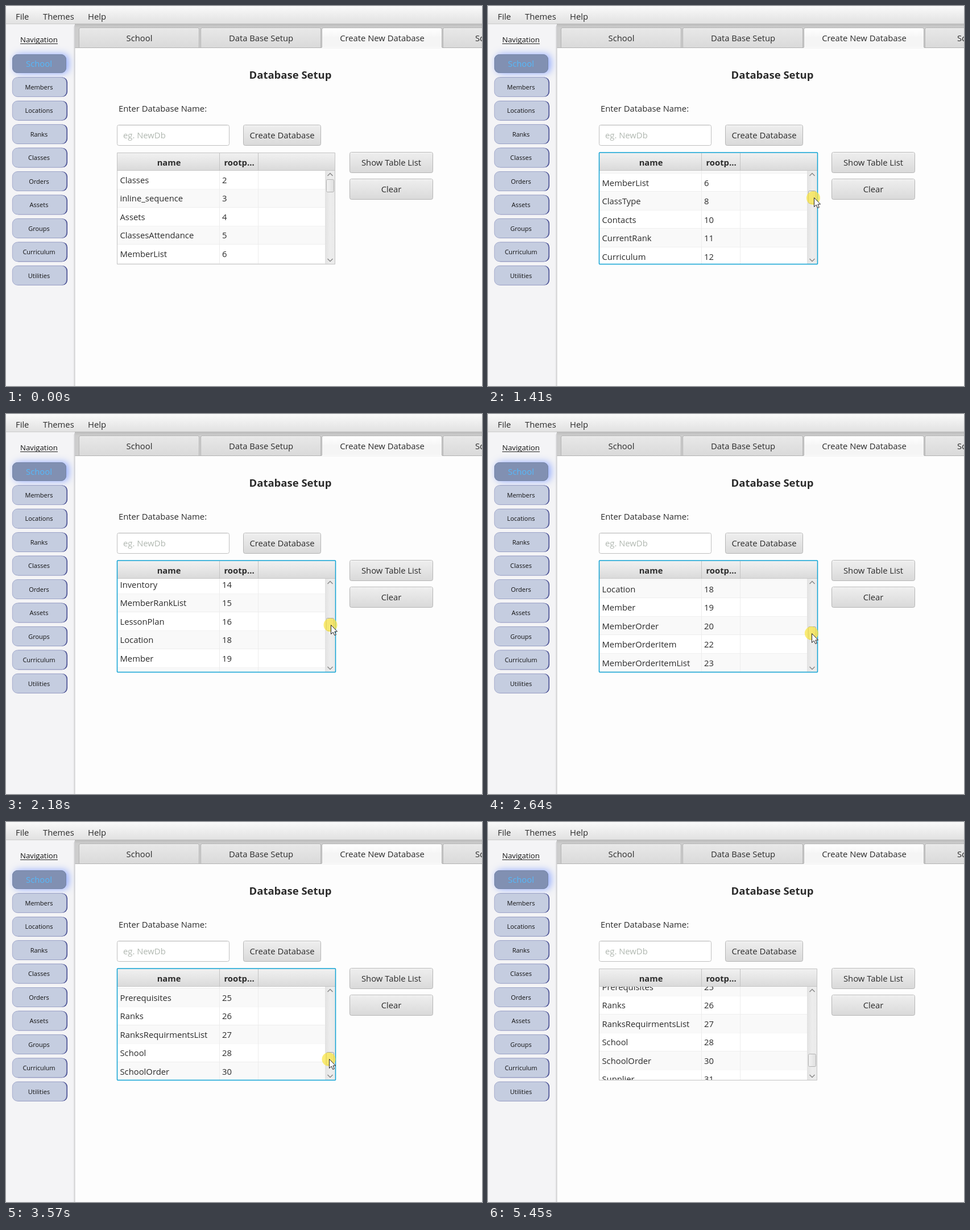
These frames come from a looping animation (837x669 px, 5600 ms). An HTML page with a canvas:

```html
<!DOCTYPE html>
<html lang="en">
<head>
<meta charset="utf-8">
<title>Database Setup</title>
<style>
  html, body { margin: 0; width: 100%; height: 100%; overflow: hidden; background: #fdfdfd; }
  canvas { display: block; }
</style>
</head>
<body>
<canvas id="stage" width="837" height="669"></canvas>
<script>
const ctx = document.getElementById('stage').getContext('2d');
const LOOP = 5600;
const FONT = '"Open Sans", "Noto Sans", sans-serif';
const INK = '#2b2b2b';
const FOCUS = '#0fa2d4';
const ROW = 32.5;
const SCROLL_RATIO = 6.13;
const PRESS = 1000, RELEASE = 3970, BLUR = 5450;

const rows = [
  ['Classes', 2], ['inline_sequence', 3], ['Assets', 4], ['ClassesAttendance', 5],
  ['MemberList', 6], ['ClassType', 8], ['Contacts', 10], ['CurrentRank', 11],
  ['Curriculum', 12], ['GroupData', 13], ['Inventory', 14], ['MemberRankList', 15],
  ['LessonPlan', 16], ['Location', 18], ['Member', 19], ['MemberOrder', 20],
  ['MemberOrderItem', 22], ['MemberOrderItemList', 23], ['MemberType', 24],
  ['Prerequisites', 25], ['Ranks', 26], ['RanksRequirmentsList', 27],
  ['School', 28], ['SchoolOrder', 30], ['Supplier', 31]
];
const navItems = ['Members', 'Locations', 'Ranks', 'Classes', 'Orders',
  'Assets', 'Groups', 'Curriculum', 'Utilities'];

// Bursts of motion: start, end, number of picture changes
const bursts = [
  [70, 620, 8], [700, 850, 3], [1000, 1550, 8], [1640, 2180, 8],
  [2240, 2790, 8], [2880, 3420, 8], [3500, 3740, 4], [3970, 4200, 4]
];
// Pointer path: time, x, y
const approach = [[70, 681, 618], [227, 612, 470], [385, 553, 362], [620, 571, 326],
  [700, 572, 323], [850, 573, 317], [1000, 573, 317]];
const leave = [[3970, 574, 440], [4050, 600, 524], [4125, 638, 640], [4200, 680, 720]];
// While dragging: time, x, scroll offset
const drag = [[1000, 573, 0], [1794, 572, 253], [2180, 571, 331],
  [3034, 568, 500], [3580, 568, 614.5], [3740, 568, 633.5]];

function along(keys, t) {
  if (t <= keys[0][0]) return keys[0].slice(1);
  for (let i = 1; i < keys.length; i++) {
    const a = keys[i - 1], b = keys[i];
    if (t <= b[0]) {
      const k = (t - a[0]) / (b[0] - a[0]);
      return [a[1] + (b[1] - a[1]) * k, a[2] + (b[2] - a[2]) * k];
    }
  }
  return keys[keys.length - 1].slice(1);
}

// Holds the picture between changes
function steppedTime(t) {
  let held = 0;
  for (const [start, end, count] of bursts) {
    if (t < start) break;
    const gap = (end - start) / (count - 1);
    held = start + gap * Math.min(count - 1, Math.floor((t - start + 15) / gap));
  }
  return held;
}

function gradient(x0, y0, x1, y1, ...colors) {
  const g = ctx.createLinearGradient(x0, y0, x1, y1);
  colors.forEach((c, i) => g.addColorStop(i / (colors.length - 1), c));
  return g;
}

function rect(x, y, w, h, fill) {
  ctx.fillStyle = fill;
  ctx.fillRect(x, y, w, h);
}

function box(x, y, w, h, r, fill, stroke, width = 1) {
  ctx.beginPath();
  ctx.roundRect(x, y, w, h, r);
  if (fill) { ctx.fillStyle = fill; ctx.fill(); }
  if (stroke) { ctx.strokeStyle = stroke; ctx.lineWidth = width; ctx.stroke(); }
}

function text(str, x, midY, { size = 14.8, weight = 400, color = INK, align = 'left' } = {}) {
  ctx.font = `${weight} ${size}px ${FONT}`;
  ctx.fillStyle = color;
  ctx.textAlign = align;
  ctx.textBaseline = 'alphabetic';
  ctx.fillText(str, x, Math.round(midY + size * 0.357));
}

function button(label, x, y, w, h) {
  box(x + .5, y + .5, w - 1, h - 1, 3, gradient(0, y, 0, y + h, '#efefef', '#d9d9d9'), '#b5b5b5');
  rect(x + 2, y + 1, w - 4, 1, '#f8f8f8');
  text(label, x + w / 2, y + h / 2 + .5, { align: 'center' });
}

function drawMenu() {
  rect(0, 0, 837, 32, gradient(0, 0, 0, 32, '#fafafa', '#ededed', '#e1e1e1'));
  rect(0, 31, 837, 1, '#cbcbcb');
  text('File', 17, 18.5);
  text('Themes', 65, 18.5);
  text('Help', 144, 18.5);
}

function drawNav() {
  rect(0, 32, 121, 637, '#f4f4f6');
  rect(118, 36, 2, 633, '#ebebed');
  rect(120, 34, 1.5, 635, '#cdcdcf');
  text('Navigation', 58, 59.5, { size: 13.2, align: 'center', color: '#111' });
  rect(25, 66, 66, 1, '#222');

  ctx.save();
  ctx.shadowColor = '#8ea8ff';
  ctx.shadowBlur = 13;
  ctx.shadowOffsetX = 4;
  box(11, 85, 95, 33, 9, '#8190b2');
  ctx.restore();
  box(11.5, 85.5, 94, 32, 9, null, '#7786aa');
  text('School', 58, 102, { align: 'center', color: '#55b9fb' });

  navItems.forEach((name, i) => {
    const y = 125.5 + i * 41.45;
    box(13, y, 95, 34.5, 9, '#343b86');
    box(11.3, y + .2, 95, 34, 9, '#c5cde0', '#a0a6ca', .9);
    text(name, 58, y + 17.5, { size: 11, align: 'center', color: '#111' });
  });
}

function drawTab(label, x, selected, labelX) {
  const fill = selected ? gradient(0, 39, 0, 73, '#ffffff', '#f5f5f5', '#f5f5f5')
    : gradient(0, 39, 0, 73, '#e8e8e8', '#dadada');
  box(x, 39, 212, selected ? 36 : 34, [3, 3, 0, 0], fill);
  ctx.strokeStyle = '#b3b3b3';
  ctx.lineWidth = 1;
  ctx.beginPath();
  ctx.moveTo(x + .5, 73);
  ctx.lineTo(x + .5, 41);
  ctx.quadraticCurveTo(x + .5, 38.5, x + 3, 38.5);
  ctx.lineTo(x + 209, 38.5);
  ctx.quadraticCurveTo(x + 211.5, 38.5, x + 211.5, 41);
  ctx.lineTo(x + 211.5, 73);
  ctx.stroke();
  if (!selected) rect(x + 2, 39, 208, 1, '#f2f2f2');
  text(label, labelX ?? x + 106.5, 57, { align: labelX ? 'left' : 'center' });
}

function drawContent() {
  rect(121, 32, 716, 637, '#fdfdfd');
  rect(121, 31, 716, 42, gradient(0, 31, 0, 38, '#bababa', '#cdcdcd'));
  rect(121, 73, 716, 1, '#b3b3b3');
  drawTab('School', 128);
  drawTab('Data Base Setup', 342);
  drawTab('Create New Database', 555, true);
  rect(556, 72, 210, 2, '#f8f8f8');
  drawTab('School Setup', 768, false, 825);

  text('Database Setup', 500, 121.5, { size: 18.5, weight: 700, align: 'center' });
  text('Enter Database Name:', 198, 180.5);
  box(195.5, 209.5, 197, 36, 3, '#fff', '#bfbfbf');
  rect(197, 210, 194, 1, '#ededed');
  text('eg. NewDb', 206, 228, { color: '#b1b8b1' });
  button('Create Database', 417, 209, 137, 37);
  button('Show Table List', 604, 257, 147, 37);
  button('Clear', 604, 304, 147, 37);
}

function chevron(y, dir) {
  ctx.beginPath();
  ctx.moveTo(565.5, y + 2.5 * dir);
  ctx.lineTo(570, y - 2 * dir);
  ctx.lineTo(574.5, y + 2.5 * dir);
  ctx.strokeStyle = '#8a8a8a';
  ctx.lineWidth = 1.5;
  ctx.stroke();
}

function drawRows(scroll, focused) {
  ctx.save();
  ctx.beginPath();
  ctx.rect(196, 290, 365, 164);
  ctx.clip();
  rows.forEach(([name, page], i) => {
    const y = 290 + i * ROW - scroll;
    if (y > 454 || y + ROW < 290) return;
    rect(196, y, 365, ROW, i % 2 ? '#f9f9f9' : '#ffffff');
    rect(196, Math.round(y + ROW) - 1, 365, 1, '#eeeeee');
    text(name, 200.5, y + 16.5);
    text(page, 380, y + 16.5);
  });
  rect(375, 290, 1, 164, '#ececec');
  rect(443, 290, 1, 164, '#ececec');
  if (focused) {
    ctx.strokeStyle = FOCUS;
    ctx.lineWidth = 1;
    ctx.strokeRect(197.5, 291.5 - Math.round(scroll), 362, 30);
  }
  ctx.restore();
}

function drawTable(scroll, focused, pressed) {
  rect(196, 258, 383, 196, '#fff');
  drawRows(scroll, focused);
  rect(196, 258, 383, 32, gradient(0, 258, 0, 290, '#f1f1f1', '#e6e6e6', '#d9d9d9'));
  rect(196, 289, 383, 1, '#c6c6c6');
  rect(375, 259, 1, 31, '#c3c3c3');
  rect(443, 259, 1, 31, '#c3c3c3');
  text('name', 286.5, 275.5, { weight: 700, size: 14.7, align: 'center' });
  text('rootp...', 410, 275.5, { weight: 700, align: 'center' });

  rect(561, 290, 18, 164, gradient(561, 0, 579, 0, '#e2e2e2', '#ededed', '#e9e9e9'));
  chevron(296.5, 1);
  chevron(447.5, -1);
  const top = Math.round(305 + scroll / SCROLL_RATIO);
  box(563.5, top + .5, 13, 22, 2, gradient(563, 0, 577, 0, '#f4f4f4', '#dedede'),
    pressed ? '#a3a3a3' : '#b2b2b2');

  if (focused) box(195.5, 258, 384, 196.5, 1, null, FOCUS, 1.5);
  else box(195.5, 258.5, 383, 196, 0, null, '#c3c3c3');
}

function drawPointer(x, y) {
  const shape = [[0, 0], [0, 16], [3.7, 12.6], [6.2, 18], [8.8, 17], [6.4, 11.5], [11, 11.5]];
  ctx.beginPath();
  shape.forEach(([dx, dy]) => ctx.lineTo(x + dx, y + dy));
  ctx.closePath();
  ctx.fillStyle = '#fff';
  ctx.fill();
  ctx.strokeStyle = '#222';
  ctx.lineWidth = 1;
  ctx.lineJoin = 'miter';
  ctx.stroke();
}

function drawSpot(x, y, radius) {
  ctx.beginPath();
  ctx.arc(x, y, radius, 0, Math.PI * 2);
  ctx.fillStyle = 'rgba(250, 228, 64, .72)';
  ctx.fill();
}

function render(t) {
  const held = steppedTime(t);
  const pressed = t >= PRESS && t < RELEASE;
  const focused = t >= PRESS && t < BLUR;
  const [dragX, scroll] = along(drag, held);
  let pointer = along(t < PRESS ? approach : leave, held);
  if (pressed) pointer = [dragX, 317 + scroll / SCROLL_RATIO];

  drawMenu();
  drawContent();
  drawNav();
  drawTable(scroll, focused, pressed);
  if (pressed) drawSpot(pointer[0] - .5, pointer[1] + .5, held > PRESS ? 12 : 11);
  if (t >= 70) drawPointer(Math.round(pointer[0]) + .5, Math.round(pointer[1]) + .5);
}

const begin = performance.now();
function tick() {
  render((performance.now() - begin) % LOOP);
  requestAnimationFrame(tick);
}
tick();
</script>
</body>
</html>
```
